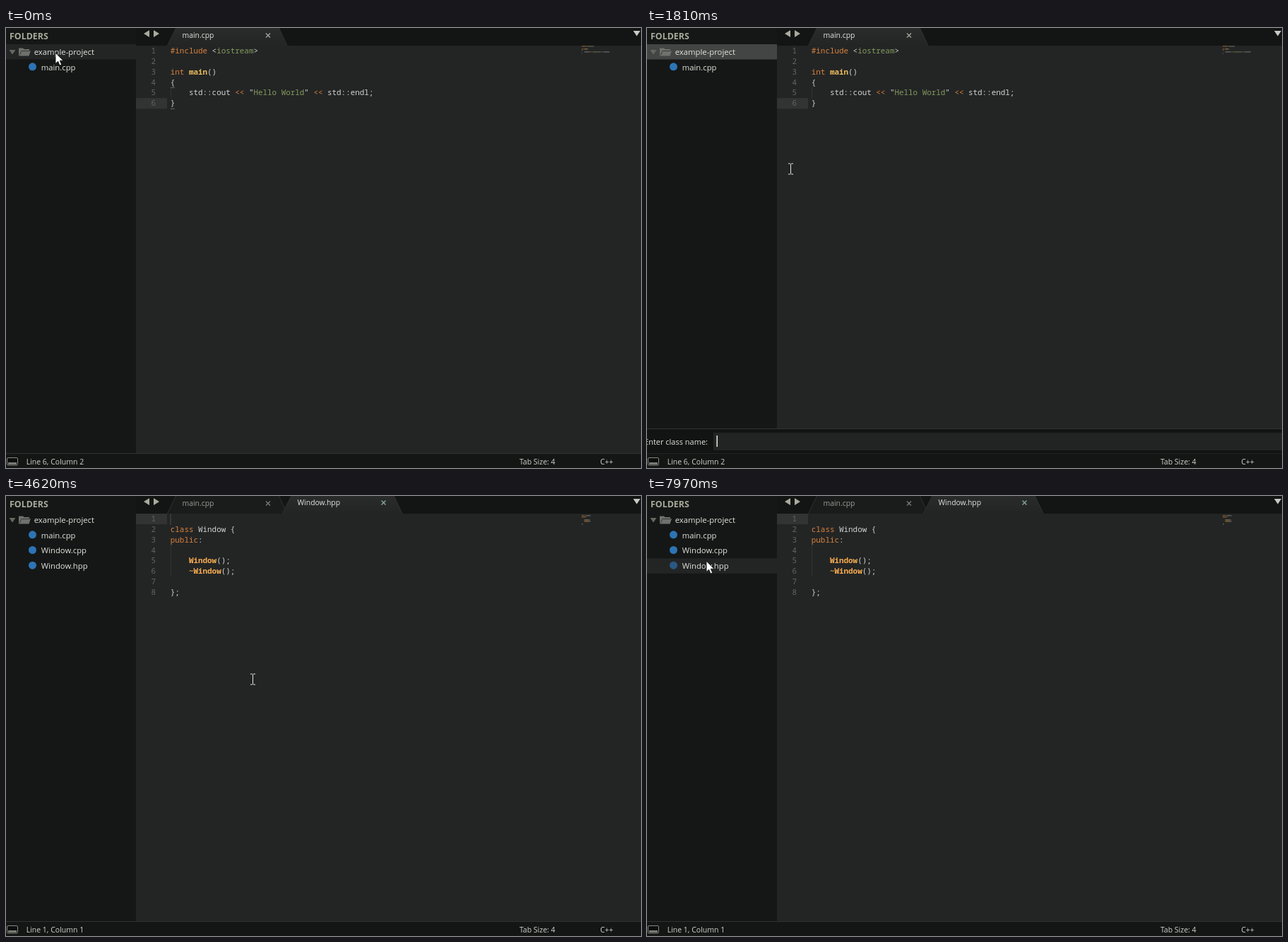
An HTML page that plays this animation: 899 by 623 pixels, repeating every 8 s.

```html
<!DOCTYPE html>
<html lang="en">
<head>
<meta charset="utf-8">
<title>Create class</title>
<style>
html, body { margin: 0; width: 100%; height: 100%; overflow: hidden; background: #232525; }
svg { display: block; width: 100%; height: 100%; }
text { font-family: "Open Sans", "Noto Sans", sans-serif; font-size: 11.3px; white-space: pre; fill: #e2e3dd; }
.small { font-size: 10.4px; }
.status { font-size: 10.5px; fill: #d2d3ce; }
.head { font-size: 12.4px; font-weight: 700; fill: #a8aa9b; }
.code { font-family: "Noto Sans Mono", "DejaVu Sans Mono", monospace; font-size: 10.9px; font-weight: 500; fill: #d0d3d2; }
.num { font-weight: 400; fill: #5d6764; }
.k { fill: #d9813b; }
.s { fill: #859b5e; }
.f { fill: #edbd5e; font-weight: 600; }
.c { fill: #f8ad50; font-weight: 600; }
#menu text { fill: #0c0c0c; }
</style>
</head>
<body>
<svg id="stage" viewBox="0 0 899 623" preserveAspectRatio="none">
  <defs>
    <linearGradient id="tabFill" x1="0" y1="0" x2="0" y2="1">
      <stop offset="0" stop-color="#2a2c2c"/><stop offset="1" stop-color="#232525"/>
    </linearGradient>
  </defs>
  <rect width="899" height="623" fill="#232525"/>
  <rect width="899" height="25" fill="#131514"/>
  <rect width="184" height="603" fill="#151716"/>

  <g id="tabs">
    <path d="M195 8L203 3V13ZM217 8L209 3V13Z" fill="#a9ab9c"/>
    <path d="M888 4H898L893 11.5Z" fill="#c9cac4"/>
    <path id="mainTab" d="M228.5 25L241 -1H386L398 25" stroke="#2e3130"/>
    <text id="mainLabel" class="small" x="249.5" y="13.8">main.cpp</text>
    <path id="mainClose" d="M368 7.5l6 6m0-6l-6 6" stroke-width="1.4"/>
    <g id="newTab">
      <path d="M391.5 25L404 -1H549L561 25" fill="url(#tabFill)" stroke="#2e3130"/>
      <text class="small" x="412.5" y="13">Window.hpp</text>
      <path d="M531.5 6.5l6 6m0-6l-6 6" stroke="#84a893" stroke-width="1.4"/>
    </g>
  </g>

  <g id="sidebar">
    <text class="head" x="5" y="16.3">FOLDERS</text>
    <rect id="hover" width="184" height="21.5" fill="#232525"/>
    <rect id="selected" y="23" width="184" height="21.5" fill="#434544"/>
    <path d="M4.5 31H13.5L9 37.5Z" fill="#646860"/>
    <path d="M18 39.5V28.5H24L25.5 30H33V32H35L32.5 39.5Z" fill="#6f716d"/>
    <path d="M19 38.5L22 32.5H34" fill="none" stroke="#2b2d2c" stroke-width=".8"/>
    <text x="39.7" y="37.8">example-project</text>
  </g>

  <g id="oldCode"></g>
  <g id="newCode"></g>
  <path id="brackets" d="M233.5 84.5h6M233.5 114.5h6" stroke="#a5a8a4" stroke-dasharray="1 1"/>
  <rect id="caret" x="232" y="25" width="1.8" height="16" fill="#f8f8f2"/>

  <rect y="602" width="899" height="21" fill="#141615"/>
  <rect y="602" width="899" height="1" fill="#2f3231"/>
  <rect x="1.5" y="608.5" width="15" height="10.5" rx="1.5" fill="#0d0f0e" stroke="#858780"/>
  <rect x="3" y="615" width="12" height="3" fill="#797b75"/>
  <text id="place" class="status" x="28.7" y="617.8"></text>
  <text class="status" x="726.9" y="617.8">Tab Size: 4</text>
  <text class="status" x="841.2" y="617.8">C++</text>

  <g id="panel">
    <rect y="567" width="899" height="35.5" fill="#121413"/>
    <rect y="567" width="899" height="1" fill="#303332"/>
    <rect x="94" y="573" width="805" height="25" fill="#222424"/>
    <text x="86" y="590" text-anchor="end" style="font-size:11px">Enter class name:</text>
    <text id="typed" class="code" x="99" y="589.5"></text>
    <rect id="inputCaret" y="577" width="1.4" height="16" fill="#f8f8f2"/>
  </g>

  <g id="menu">
    <rect x="81" y="39" width="237" height="172.5" fill="#000" opacity=".3"/>
    <rect x="79.5" y="37.5" width="236.5" height="172" fill="#f2f2f2" stroke="#b4b4b4"/>
    <path d="M110 86.5H313M110 181.5H313" stroke="#d5d5d5"/>
    <rect id="pick" x="82" width="231.5" height="22.5" fill="#91c9f7"/>
  </g>

  <g id="mouse">
    <path id="arrow" d="M0 0V15.5L3.6 12.2L6 18L8.7 16.8L6.3 11.2H11Z" fill="#fff" stroke="#111" stroke-width=".9"/>
    <path id="beam" transform="translate(.5 .5)" d="M-3.5 -7.5H-1.2L0 -6.5L1.2 -7.5H3.5M-3.5 7.5H-1.2L0 6.5L1.2 7.5H3.5M0 -6.5V6.5" fill="none" stroke="#e6e6e6"/>
  </g>
</svg>
<script>
const LOOP = 8000;
const CHAR = 6.54;
const $ = id => document.getElementById(id);

function add(parent, tag, attrs, text) {
  const el = document.createElementNS("http://www.w3.org/2000/svg", tag);
  for (const name in attrs) el.setAttribute(name, attrs[name]);
  if (text) el.textContent = text;
  parent.append(el);
  return el;
}
const set = (id, name, value) => $(id).setAttribute(name, value);
const show = (id, on) => set(id, "opacity", on ? 1 : 0);

// Each line is a list of [class, text] tokens.
const oldLines = [
  [["k", "#include"], ["", " <"], ["s", "iostream"], ["", ">"]],
  [],
  [["k", "int "], ["f", "main"], ["", "()"]],
  [["", "{"]],
  [["", "    std::cout "], ["k", "<<"], ["", " \""], ["s", "Hello World"], ["", "\" "], ["k", "<<"], ["", " std::endl;"]],
  [["", "}"]]
];
const newLines = [
  [],
  [["k", "class"], ["", " Window {"]],
  [["k", "public"], ["", ":"]],
  [],
  [["", "    "], ["c", "Window"], ["", "();"]],
  [["", "    "], ["c", "~Window"], ["", "();"]],
  [],
  [["", "};"]]
];

function buildCode(id, lines, current, guide) {
  const g = $(id);
  add(g, "rect", { x: 184, y: 25 + current * 14.85, width: 44, height: 15, fill: "#313433" });
  add(g, "rect", { x: 233, y: guide[0], width: 1, height: guide[1], fill: "#303332" });
  lines.forEach((tokens, i) => {
    const y = 35.9 + i * 14.87;
    add(g, "text", { class: "code num", x: 212, y, "text-anchor": "end" }, String(i + 1));
    const row = add(g, "text", { class: "code", x: 232.8, y });
    let col = 0;
    for (const [cls, text] of tokens) {
      add(row, "tspan", { class: cls }, text);
      // The minimap repeats each token as a thin bar.
      const lead = text.length - text.trimStart().length;
      const size = text.trim().length;
      if (size) add(g, "rect", {
        x: 815 + (col + lead) * 0.9, y: 25.3 + i * 2, width: size * 0.9, height: 1.1, opacity: 0.6,
        class: cls, fill: "#a3a6a2"
      });
      col += text.length;
    }
  });
}
buildCode("oldCode", oldLines, 5, [84, 15]);
buildCode("newCode", newLines, 0, [69, 45]);

["main.cpp", "Window.cpp", "Window.hpp"].forEach((name, i) => {
  const g = add($("sidebar"), "g", { id: "file" + i });
  add(g, "circle", { id: "icon" + i, cx: 37.5, cy: 54.8 + i * 21.7, r: 5.5, fill: "#2d74b5" });
  add(g, "text", { x: 49.7, y: 59.6 + i * 21.75 }, name);
});

const items = [
  ["New File", 39], ["Rename...", 61], ["New Folder...", 90], ["Delete Folder", 112],
  ["Find in Folder...", 134], ["Remove Folder from Project", 156], ["Create C++ Class", 184.5]
];
for (const [label, top] of items) add($("menu"), "text", { x: 114.3, y: top + 15.2 }, label);

// Start, end, number of steps, then the points passed.
const moves = [
  [80, 230, 3, [70, 35], [80, 37]],
  [630, 1020, 6, [80, 37], [150, 112], [196, 204]],
  [1190, 1260, 2, [196, 204], [196, 196]],
  [1740, 2270, 8, [196, 196], [349, 259]],
  [5000, 5160, 3, [349, 259], [347, 220]],
  [5460, 6240, 12, [347, 218], [500, 150], [430, 50], [281, 24]],
  [6400, 7100, 10, [281, 24], [304, 16], [165, 58], [80, 75]],
  [7220, 7970, 11, [80, 75], [92, 106], [84, 92]]
];
const caretSteps = [
  [0, 0], [4150, 1], [4470, 0.6], [4620, 0.1], [5000, 0.4], [5080, 0.8], [5160, 1], [5540, 0.5],
  [5620, 0], [6010, 0.4], [6090, 0.8], [6170, 1], [6560, 0.5], [6640, 0], [7030, 0.5], [7100, 1],
  [7530, 0.5], [7610, 0]
];
const inputSteps = [[0, 1], [2740, 0.35], [2820, 0], [3200, 1]];
const typedSteps = [[0, ""], [3200, "W"], [3450, "Wi"], [3530, "Win"], [3600, "Wind"], [3680, "Window"]];
const tabSteps = [[0, 0], [4150, 0.4], [4300, 0.7], [4390, 0.85], [4470, 1]];

function stepAt(table, t) {
  let value = table[0][1];
  for (const [time, v] of table) if (t >= time) value = v;
  return value;
}

function mouseAt(t) {
  let move = moves[0];
  for (const m of moves) if (t >= m[0]) move = m;
  const [start, end, steps, ...pts] = move;
  if (t < start) return pts[0];
  const gap = (end - start) / (steps - 1);
  const p = Math.min(1, (Math.floor((t - start) / gap + 0.01) + 1) / steps);
  const along = p * p * (3 - 2 * p) * (pts.length - 1);
  const i = Math.min(Math.floor(along), pts.length - 2);
  return pts[i].map((v, axis) => v + (pts[i + 1][axis] - v) * (along - i));
}

function draw(t) {
  const [x, y] = mouseAt(t).map(Math.round);
  const menuOpen = t >= 470 && t < 1740;
  const panelOpen = t >= 1740 && t < 4060;
  const created = t >= 4150;
  const listed = t >= 4300;

  set("mouse", "transform", `translate(${x} ${y})`);
  const beam = !menuOpen && x > 184 && y > 25;
  show("beam", beam);
  show("arrow", !beam);

  const row = Math.floor((y - 23) / 21.75);
  const hover = !menuOpen && x < 184 && row >= 0 && row < (listed ? 4 : 2);
  show("hover", hover);
  set("hover", "y", 23 + row * 21.75);
  show("selected", t >= 470 && t < 4060);
  for (let i = 0; i < 3; i++) {
    show("file" + i, i === 0 || listed);
    set("icon" + i, "opacity", hover && row === i + 1 ? 0.65 : 1);
  }

  set("menu", "opacity", menuOpen ? (t < 550 ? 0.5 : 1) : 0);
  const item = items.find(([, top]) => y >= top && y < top + 22.5);
  show("pick", item);
  if (item) set("pick", "y", item[1]);

  show("panel", panelOpen);
  const typed = stepAt(typedSteps, t);
  $("typed").textContent = typed;
  set("inputCaret", "x", 98.5 + typed.length * CHAR);
  set("inputCaret", "opacity", stepAt(inputSteps, t));

  show("oldCode", !created);
  show("newCode", created);
  show("brackets", t < 1740);
  set("caret", "opacity", stepAt(caretSteps, t));
  $("place").textContent = created ? "Line 1, Column 1" : "Line 6, Column 2";

  set("newTab", "opacity", stepAt(tabSteps, t));
  set("mainTab", "fill", created ? "#1a1c1b" : "url(#tabFill)");
  $("mainLabel").style.fill = created ? "#9b9d94" : "#e2e3dd";
  set("mainClose", "stroke", created ? "#777a73" : "#a2a49a");
}

const begin = performance.now();
function tick() {
  draw((performance.now() - begin) % LOOP);
  requestAnimationFrame(tick);
}
tick();
</script>
</body>
</html>
```
